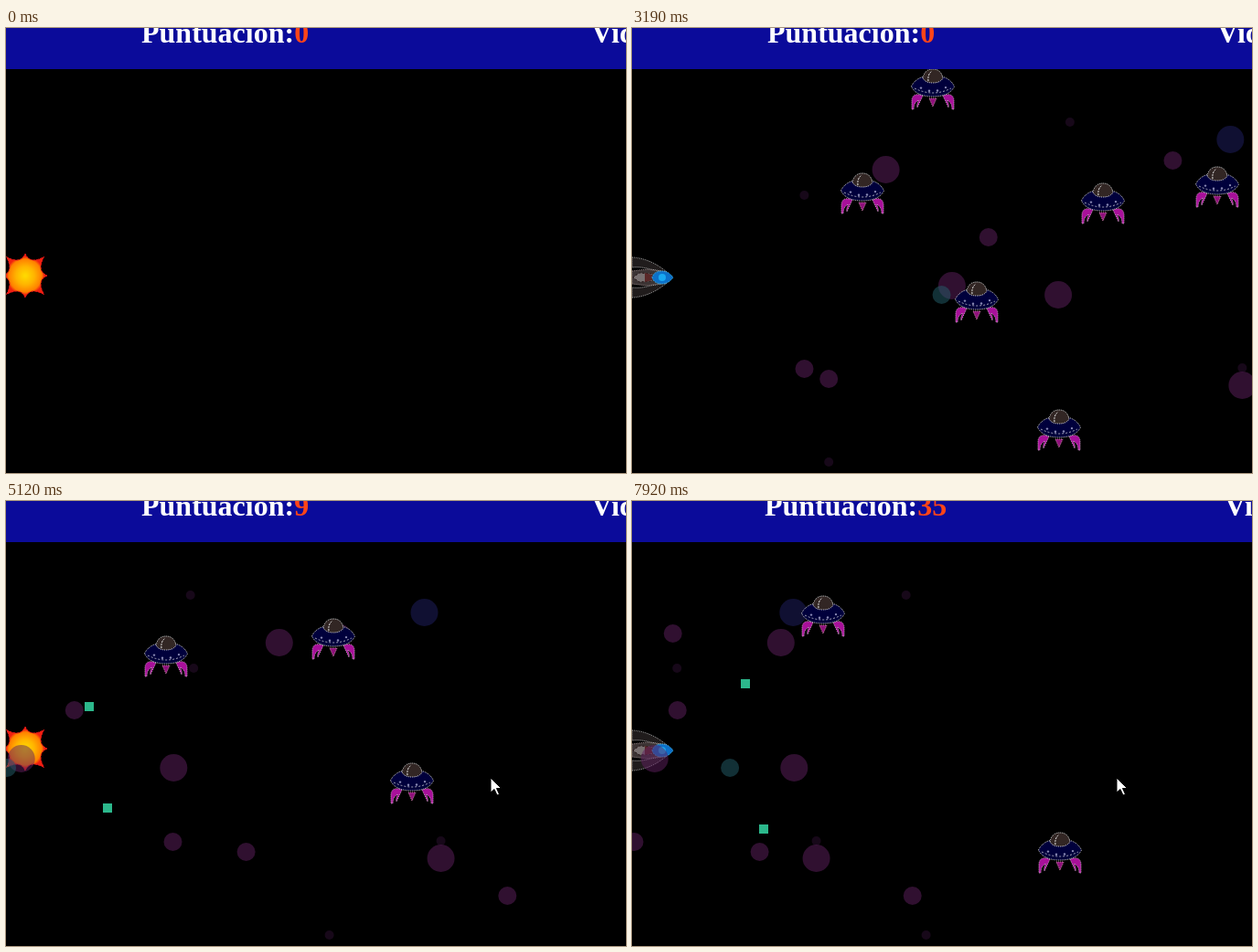
An HTML page with a canvas for the animation above (7990 ms loop, 678 by 487 pixels).

```html
<!DOCTYPE html>
<html lang="es">
<meta charset="utf-8">
<style>
  html, body { margin: 0; height: 100%; overflow: hidden; background: #000 }
  canvas { display: block }
</style>
<canvas id="stage" width="678" height="487"></canvas>
<script>
const ctx = document.getElementById('stage').getContext('2d');
const LOOP = 7990, STEP = 69.63, TAU = Math.PI * 2;
const PURPLE = 'rgba(96,32,96,.5)', DIM = 'rgba(46,16,50,.5)',
      TEAL = 'rgba(36,96,108,.5)', BLUE = 'rgba(32,32,100,.5)';

// x at step 51, y, radius, speed, distance jumped back on leaving the left edge
const STARS = [
  [133.5, 155, 15, 13.1, 388],
  [266, 229, 10, 11.25, 425],
  [219, 282, 15, 11.9, 484],
  [206, 292, 10, 12.05, 588, TEAL],
  [355, 292, 15, 10.1, 398],
  [577, 122, 15, 7.03, 700, BLUE],
  [503, 145, 10, 8.04, 700],
  [29, 373, 10, 14.5, 400],
  [59, 384, 10, 14.2, 445],
  [59, 475, 5, 14.2, 536],
  [30, 183, 5, 14.4, 420],
  [370, 103, 5, 9.9, 494],
  [592, 372, 5, 6.85, 700],
  [592, 391, 15, 6.85, 700],
  [651, 432, 10, 6.04, 700]
];

// step of entry at the right edge, y on entry, speed
const SAUCERS = [
  [5.5, 231.6, 22], [13.7, 202, 17.1], [18.6, 317, 15.2], [21.35, 82, 20], [22.9, 453.7, 13.75],
  [24.65, 204.3, 12.15], [33.9, 178.7, 10.1], [41.4, 330.7, 9.7], [79, 149, 17], [90.5, 399, 13.4]
];
const SAUCER_RISE = .8, SAUCER_REACH = 120;
const FIRST_SHOT = 49.8, RELOAD = 5.6, SHOT_SPEED = 41.8;
const BLASTS = [[-9, -3], [12, 25], [61, 71]];

function disc(x, y, r, fill) {
  ctx.fillStyle = fill;
  ctx.beginPath();
  ctx.arc(x, y, r, 0, TAU);
  ctx.fill();
}

function shape(path, fill, outline, dash = [1, 1]) {
  const p = new Path2D(path);
  ctx.fillStyle = fill;
  ctx.fill(p);
  if (!outline) return;
  ctx.setLineDash(dash);
  ctx.strokeStyle = outline;
  ctx.stroke(p);
}

function at(x, y, draw, scaleX = 1, scaleY = 1) {
  ctx.save();
  ctx.translate(x, y);
  ctx.scale(scaleX, scaleY);
  draw();
  ctx.restore();
}

function saucer() {
  for (const side of [-1, 1])
    at(0, 0, () => shape('M11 7Q22 3 23 12V22H21Q21 14 15 12Q18 16 17 20Z', '#a8109a', '#d8a8d0'), side);
  shape('M-4 10H4L0 19Z', '#90107c', '#c8a');
  shape('M-23.5-3Q-18-15 0-15T23.5-3Q18 8 0 8T-23.5-3Z', '#00003c', '#ddd');
  shape('M-20-1Q0 9 20-1', 'transparent', '#aab', [2, 2]);
  shape('M-11-12Q-9-22 0-22T11-12Q8-7 0-7T-11-12Z', '#322624', '#eee');
  shape('M-5-9Q-6-16-1-20', 'transparent', '#eee', [2, 1]);
  for (let x = -13; x < 15; x += 9) disc(x, 2 - x * x / 50, 1.2, '#8888b4');
}

function ship() {
  for (const side of [-1, 1])
    at(0, 0, () => shape('M0 22Q20 21 38 6L20 9Q10 12 0 11Z', '#201c1c', '#bbb'), 1, side);
  shape('M0-7L16-9L38-6V6L16 9L0 7Z', '#3c3434', '#988');
  shape('M1 0L8-5L22-4V4L8 5Z', '#787070', '#211', [2, 2]);
  shape('M14-5L22-3V3L14 5Z', '#5a2828');
  shape('M22 0Q24-7 33-7Q40-7 45 0Q40 7 33 7Q24 7 22 0Z', '#0c70c8', '#48c8ff');
  disc(33, 0, 4, '#18a8f0');
}

function explosion() {
  const polar = (r, k) => r * Math.cos(k * TAU / 8) + ' ' + r * Math.sin(k * TAU / 8) + ' ';
  let path = 'M' + polar(24, 0);
  for (let k = 0; k < 8; k++) path += 'Q' + polar(13, k + .5) + polar(k % 2 ? 24 : 29, k + 1);
  const glow = ctx.createRadialGradient(0, 0, 1, 0, 0, 21);
  ['#ffd800', '#ffb400', '#ff8000', '#f02010'].forEach((c, i) => glow.addColorStop([0, .45, .85, 1][i], c));
  shape(path, glow, '#f01818', [3, 1]);
}

function drawStars(n) {
  for (const [x51, y, r, speed, jump, colour = r > 5 ? PURPLE : DIM] of STARS) {
    const x = x51 - speed * (n - 51);
    const exits = Math.max(0, Math.ceil((-r - x) / jump));
    disc(x + exits * jump, y, r, colour);
  }
}

// Each volley fans out up and down, a little narrower every time.
function drawShots(n) {
  ctx.fillStyle = '#2cb88c';
  for (let born = FIRST_SHOT; born < n; born += RELOAD)
    for (const side of [-1, 1]) {
      const d = SHOT_SPEED * (n - born) + side * 10;
      const slope = side * (1.11 - born / 425);
      if (d > 0) ctx.fillRect(Math.round(37 + d), Math.round(266 + d * slope), 10, 10);
    }
}

function drawSaucers(n) {
  for (const [entry, y, speed] of SAUCERS) {
    const age = n - entry, x = 702 - speed * age;
    if (age > 0 && x > SAUCER_REACH) at(Math.round(x), Math.round(y - SAUCER_RISE * age), saucer);
  }
}

function drawHeader(n) {
  const score = n < 50 ? 0 : Math.max(1, Math.floor((n - 54.4) / 1.5));
  const wide = score > 9, x = wide ? 145 : 148, label = 'Puntuación:';
  ctx.fillStyle = '#0b0b9a';
  ctx.fillRect(0, 0, 678, 45);
  ctx.font = 'bold 32px "Liberation Serif", serif';
  ctx.fillStyle = '#fff';
  ctx.fillText(label, x, 16);
  ctx.fillText('Vidas:', wide ? 648 : 640, 16);
  ctx.fillStyle = '#ff4518';
  ctx.fillText(score, x + ctx.measureText(label).width, 16);
}

function draw(t) {
  const n = t < 200 ? -9 : Math.floor((t - 380) / STEP);
  ctx.fillStyle = '#000';
  ctx.fillRect(0, 0, 678, 487);
  if (BLASTS.some(([from, to]) => n >= from && n < to)) at(21, 271, explosion);
  else at(0, 273, ship);
  if (n >= 0 && n < 40) disc(260, 156, 5, '#04040e');
  drawStars(n);
  drawShots(n);
  drawSaucers(n);
  drawHeader(n);
  if (n >= 44) at(530, 303, () => shape('M0 0V16L4 12.5L7 19L9.5 18L6.5 11.5H11.5Z', '#fff', '#000', []));
}

function tick() {
  draw(performance.now() % LOOP);
  requestAnimationFrame(tick);
}
tick();
</script>
</html>
```
